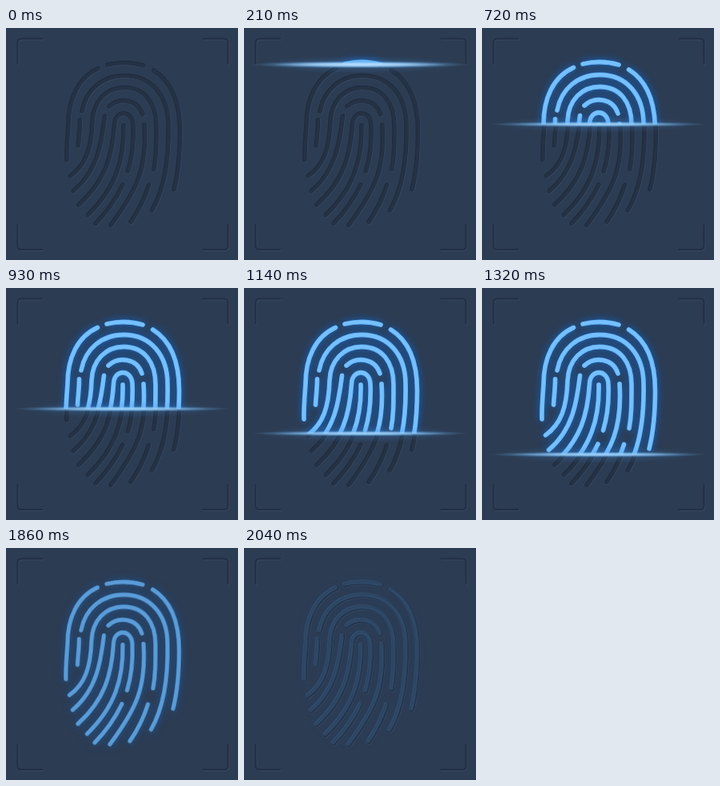
An HTML page with a canvas that plays this animation: 290 px wide and 290 px high, repeating every 2.07 s.

```html
<!DOCTYPE html>
<html lang="en">
<head>
<meta charset="utf-8">
<title>Fingerprint scan</title>
<style>
html, body { margin: 0; width: 100%; height: 100%; overflow: hidden; background: #2c3c53; }
canvas { display: block; }
</style>
</head>
<body>
<canvas id="stage" width="290" height="290"></canvas>
<script>
const SIZE = 290, LOOP = 2070, STEP = 30, FADE_START = 1650;
const ctx = document.getElementById('stage').getContext('2d');

const ridges = new Path2D([
  'M126 45 Q149 39.5 171 46',
  'M114.500 49.5 C89 61 77 88 77 120 C76 135 74.500 150 75 164',
  'M183.500 52 C206 66 216.500 92 216.500 128 C216.500 157 214 181 209 201',
  'M94 103 C99 76 120 58.500 147 58.500 C181 58.500 202 84 202 120 C203 165 197 200 181.500 227',
  'M79.500 184 C99 170 106 149 107 116 C108 90 125 73.500 147 73.500 C173 73.500 187 93 187 121 C187 145 187 159 184 175.500',
  'M177.500 195.500 C172 213 165 227 155 241.500',
  'M128 97 C141 85 164 88 170 107',
  'M172 120 C175.500 175 163 201 130 245.500',
  'M91.500 114 C91.500 127 90 135 89.500 146',
  'M122.500 109.500 C119 138 115 176 83.500 202.500',
  'M90 220 C124 189 132 158 134.500 120 C135 101 157 101 158 120 C159 143 157 160 151.500 178',
  'M146 121 C147 164 136 199 101.500 232.500',
  'M145 195 C136 214 125 229 111 243.500'
].join(' '));

const corners = new Path2D();
for (const sx of [-1, 1]) for (const sy of [-1, 1]) {
  const x = 146 + sx * 131.5, y = 145.3 + sy * 131.7;
  corners.moveTo(x - sx * 31, y);
  corners.lineTo(x - sx * 5, y);
  corners.quadraticCurveTo(x, y, x, y - sy * 5);
  corners.lineTo(x, y - sy * 31);
}

const clamp = v => Math.max(0, Math.min(1, v));

function stroke(path, color, width, shift = 0) {
  ctx.save();
  ctx.translate(shift, shift);
  ctx.lineCap = 'round';
  ctx.lineWidth = width;
  ctx.strokeStyle = color;
  ctx.stroke(path);
  ctx.restore();
}

function drawGrooves() {
  stroke(corners, '#364861', 2.2, 0.8);
  stroke(corners, '#222f43', 2);
  stroke(ridges, '#36475f', 5.4, 1.7);
  stroke(ridges, '#202c3e', 5.4, 0.9);
  stroke(ridges, '#253246', 3.8, 1.3);
}

function drawLit(scanY, alpha) {
  ctx.save();
  ctx.beginPath();
  ctx.rect(0, 0, SIZE, scanY);
  ctx.clip();
  ctx.globalAlpha = alpha;
  ctx.shadowColor = '#0f66c8';
  ctx.shadowBlur = 10;
  stroke(ridges, '#62b2fb', 5.8);
  ctx.shadowBlur = 0;
  stroke(ridges, '#76c0ff', 4.2, -0.2);
  ctx.restore();
}

// Soft ellipse; rgb is a "r,g,b" string
function glow(y, rx, ry, rgb, alpha) {
  ctx.save();
  ctx.translate(145, y);
  ctx.scale(rx, ry);
  const g = ctx.createRadialGradient(0, 0, 0, 0, 0, 1);
  g.addColorStop(0, `rgba(${rgb},${alpha})`);
  g.addColorStop(0.45, `rgba(${rgb},${alpha * 0.7})`);
  g.addColorStop(1, `rgba(${rgb},0)`);
  ctx.fillStyle = g;
  ctx.fillRect(-1, -1, 2, 2);
  ctx.restore();
}

function drawBeam(y, t) {
  const alpha = clamp(t / 120) * clamp((1755 - t) / 190);
  const flare = clamp((510 - t) / 300);
  glow(y, 125, 11, '62,140,220', 0.27 * alpha);
  glow(y, 136, 3.8 + flare, '110,185,245', 0.95 * alpha);
  glow(y, 110, 2.4 + flare, '195,228,255', (0.6 + 0.3 * flare) * alpha);
}

function draw(now) {
  const t = Math.floor(now % LOOP / STEP) * STEP;
  const scanY = 15 + t * 0.1463;
  ctx.fillStyle = '#2c3c53';
  ctx.fillRect(0, 0, SIZE, SIZE);
  drawGrooves();
  drawLit(scanY, 1 - clamp((t - FADE_START) / 425));
  drawBeam(scanY, t);
}

const start = performance.now();
function tick() {
  draw(performance.now() - start);
  requestAnimationFrame(tick);
}
tick();
</script>
</body>
</html>
```
